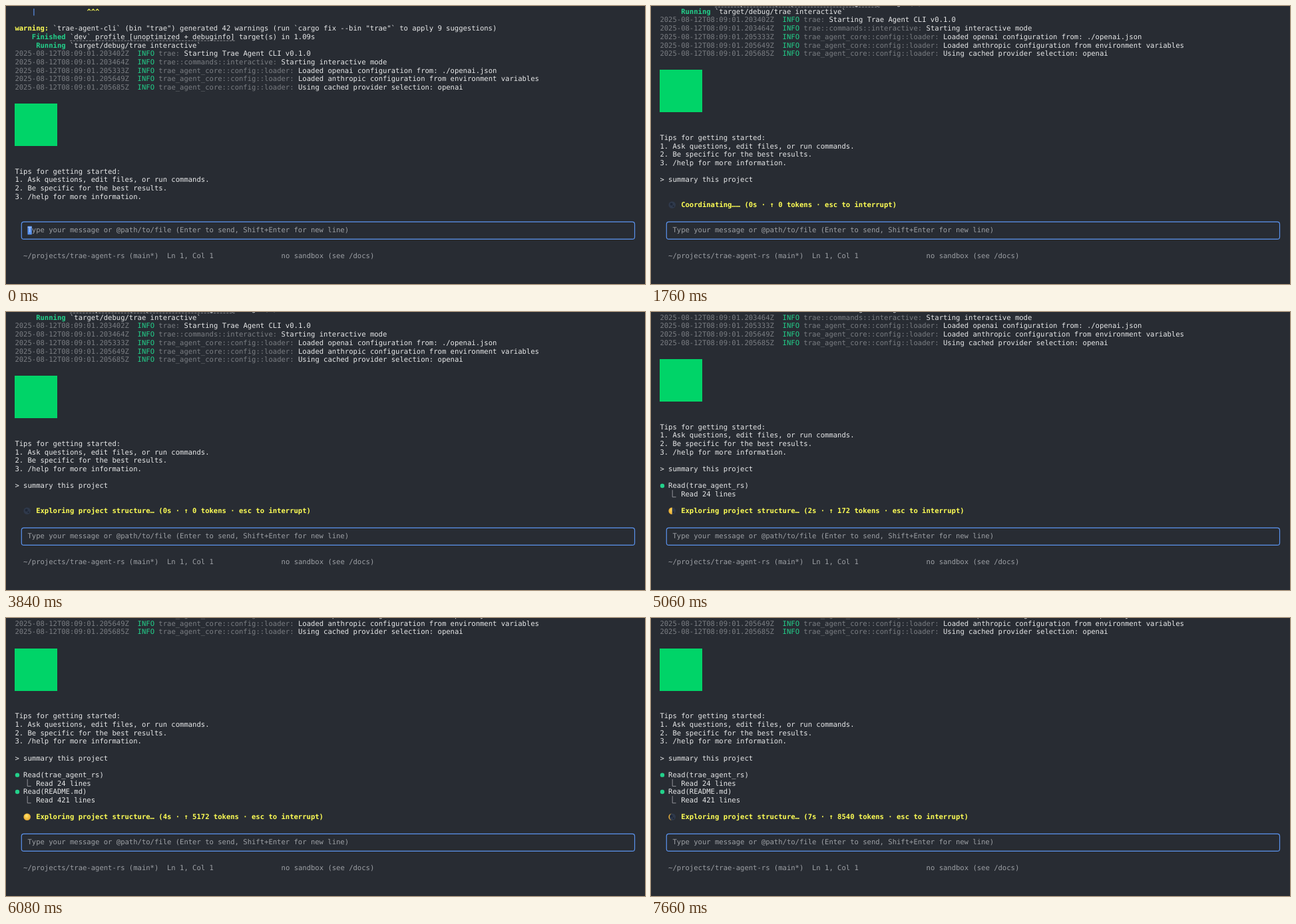
These frames come from a looping animation (960x419 px, 8000 ms). An HTML page with a canvas:

```html
<!DOCTYPE html>
<html lang="en">
<head>
<meta charset="utf-8">
<title>Terminal session</title>
<style>
  html, body { margin: 0; width: 100%; height: 100%; overflow: hidden; background: #282c33; }
  canvas { display: block; }
</style>
</head>
<body>
<canvas id="stage" width="960" height="419"></canvas>
<script>
const ctx = document.getElementById('stage').getContext('2d');
const LOOP = 8000, TICK = 20;
const LEFT = 13.4, TOP = 8, CELL = 6.352, PITCH = 12.68, SIZE = 10.55;
const FAMILY = '"DejaVu Sans Mono", "Liberation Mono", monospace';
const INK = {
  back: '#282c33', white: '#e8e9ea', gray: '#7b7e83', soft: '#9da0a5',
  green: '#23d18b', yellow: '#ffff55', blue: '#5b93ee', logo: '#00d468'
};

const PROMPT = 'summary this project';
const TYPE_START = 340, KEY_TIME = 65, SUBMIT = 1700;
const READ_DIR = 5040, READ_FILE = 6060;

// Step tracks: [time, value]
const SCROLL = [[0, 0], [SUBMIT, 4], [READ_DIR, 6], [READ_FILE, 8]];
const SECONDS = [[0, 0], [4540, 1], [5040, 2], [5440, 3], [5860, 4], [6260, 5], [6860, 6], [7300, 7]];
const MOON = [[0, 0], [1920, 1], [2260, 2], [2560, 3], [2800, 4], [3020, 5], [3260, 6], [3540, 7],
  [3760, 0], [4240, 2], [4540, 4], [4720, 5], [5040, 6], [5280, 7], [5420, 0], [5560, 2],
  [5700, 3], [5860, 4], [6260, 5]];

const stepAt = (track, t) => track.filter(([start]) => start <= t).pop()[1];
const easeOut = (t, start, length) => {
  const u = Math.min(1, Math.max(0, (t - start) / length));
  return 1 - (1 - u) ** 2;
};
const colX = col => LEFT + col * CELL;
const rowY = row => TOP + row * PITCH;

function text(str, col, row, color = INK.white, bold = false) {
  ctx.font = `${bold ? 'bold ' : ''}${SIZE}px ${FAMILY}`;
  ctx.fillStyle = color;
  ctx.fillText(str, colX(col), rowY(row) + 3.8);
}

function logLine(row, micros, module, message) {
  text(`2025-08-12T08:09:01.${micros}Z`, 0, row, INK.gray);
  text('INFO', 29, row, INK.green);
  text(module + ':', 34, row, INK.gray);
  text(message, 36 + module.length, row);
}

function buildOutput(top) {
  text('|', 4, top, INK.blue, true);
  text('^^^', 17, top, INK.yellow, true);
  text('warning:', 0, top + 2, INK.yellow, true);
  text('`trae-agent-cli` (bin "trae") generated 42 warnings (run `cargo fix --bin "trae"` to apply 9 suggestions)', 9, top + 2);
  text('Finished', 4, top + 3, INK.green, true);
  text('`dev` profile [unoptimized + debuginfo] target(s) in 1.09s', 13, top + 3);
  ctx.strokeStyle = INK.soft;
  ctx.lineWidth = 0.8;
  ctx.setLineDash([3.2, 1.6]);
  ctx.beginPath();
  ctx.moveTo(colX(13), rowY(top + 3) + 6.3);
  ctx.lineTo(colX(52), rowY(top + 3) + 6.3);
  ctx.stroke();
  ctx.setLineDash([]);
  text('Running', 5, top + 4, INK.green, true);
  text('`target/debug/trae interactive`', 13, top + 4);
}

function startup(top) {
  const loader = 'trae_agent_core::config::loader';
  logLine(top + 5, '203402', 'trae', 'Starting Trae Agent CLI v0.1.0');
  logLine(top + 6, '203464', 'trae::commands::interactive', 'Starting interactive mode');
  logLine(top + 7, '205333', loader, 'Loaded openai configuration from: ./openai.json');
  logLine(top + 8, '205649', loader, 'Loaded anthropic configuration from environment variables');
  logLine(top + 9, '205685', loader, 'Using cached provider selection: openai');

  ctx.fillStyle = INK.logo;
  ctx.fillRect(13, Math.round(rowY(top + 13.5) - 32), 64, 64);

  ['Tips for getting started:',
    '1. Ask questions, edit files, or run commands.',
    '2. Be specific for the best results.',
    '3. /help for more information.'
  ].forEach((tip, i) => text(tip, 0, top + 19 + i));
}

function toolCall(row, target, lines) {
  const y = rowY(row);
  ctx.fillStyle = INK.green;
  ctx.beginPath();
  ctx.arc(17, y + 0.4, 3.2, 0, Math.PI * 2);
  ctx.fill();
  text(`Read(${target})`, 2, row);
  ctx.strokeStyle = INK.soft;
  ctx.lineWidth = 0.9;
  ctx.beginPath();
  ctx.moveTo(32.2, y + PITCH - 6);
  ctx.lineTo(32.2, y + PITCH + 4.6);
  ctx.lineTo(37.6, y + PITCH + 4.6);
  ctx.stroke();
  text(`Read ${lines} lines`, 5, row + 1);
}

function moon(phase) {
  const r = 5.3, k = Math.cos(phase * Math.PI / 4);
  ctx.save();
  ctx.translate(31.7, 299.7);
  ctx.fillStyle = '#2f394b';
  ctx.beginPath();
  ctx.arc(0, 0, r, 0, Math.PI * 2);
  ctx.fill();
  ctx.fillStyle = '#1f2736';
  ctx.beginPath();
  ctx.arc(-1, -1, 2, 0, Math.PI * 2);
  ctx.arc(2, 2, 1.2, 0, Math.PI * 2);
  ctx.fill();
  if (phase) {
    if (phase > 4) ctx.scale(-1, 1);
    const gold = ctx.createRadialGradient(-1, -2, 1, 0, 0, r);
    gold.addColorStop(0, '#ffdf68');
    gold.addColorStop(1, '#e8a92c');
    ctx.fillStyle = gold;
    ctx.beginPath();
    ctx.arc(0, 0, r, -Math.PI / 2, Math.PI / 2);
    ctx.ellipse(0, 0, Math.abs(k) * r, r, 0, Math.PI / 2, -Math.PI / 2, k > 0);
    ctx.fill();
  }
  ctx.restore();
}

function spinner(t) {
  const spin = t < 6480 ? stepAt(MOON, t) : Math.min(15, 6 + Math.floor((t - 6480) / 130));
  const task = t < 3760 ? 'Coordinating……' : 'Exploring project structure…';
  const tokens = Math.floor(5191.4 * easeOut(t, 5041.5, 1106) + 3348.6 * easeOut(t, 6470, 1180));
  moon(spin % 8);
  text(`${task} (${stepAt(SECONDS, t)}s · ↑ ${tokens} tokens · esc to interrupt)`, 5, 23, INK.yellow, true);
}

function inputBox(t) {
  const active = t < SUBMIT;
  const keys = Math.floor((t - TYPE_START) / KEY_TIME) + 1;
  const typed = active ? PROMPT.slice(0, Math.max(0, keys)) : '';

  ctx.strokeStyle = INK.blue;
  ctx.lineWidth = 1.2;
  ctx.beginPath();
  ctx.roundRect(23.3, 325.4, 921.2, 26, 3.5);
  ctx.stroke();

  if (typed) text(typed, 3, 26);
  else text('Type your message or @path/to/file (Enter to send, Shift+Enter for new line)', 3, 26, INK.soft);
  if (active) {
    ctx.fillStyle = INK.blue;
    ctx.fillRect(colX(3 + typed.length), 331.8, CELL, 12.7);
    if (!typed) text('T', 3, 26, '#b8cdf5');
  }

  text(`~/projects/trae-agent-rs (main*)  Ln 1, Col ${typed.length + 1}`, 2, 29, INK.soft);
  text('no sandbox (see /docs)', 63, 29, INK.soft);
}

function draw(now) {
  const t = Math.floor(now % LOOP / TICK) * TICK;
  const top = -stepAt(SCROLL, t);
  ctx.textRendering = 'geometricPrecision';
  ctx.fillStyle = INK.back;
  ctx.fillRect(0, 0, 960, 419);

  buildOutput(top);
  startup(top);
  if (t >= SUBMIT) {
    text('> ' + PROMPT, 0, top + 24);
    spinner(t);
  }
  if (t >= READ_DIR) toolCall(top + 26, 'trae_agent_rs', 24);
  if (t >= READ_FILE) toolCall(top + 28, 'README.md', 421);
  inputBox(t);
}

function frame() {
  draw(performance.now());
  requestAnimationFrame(frame);
}
frame();
</script>
</body>
</html>
```
